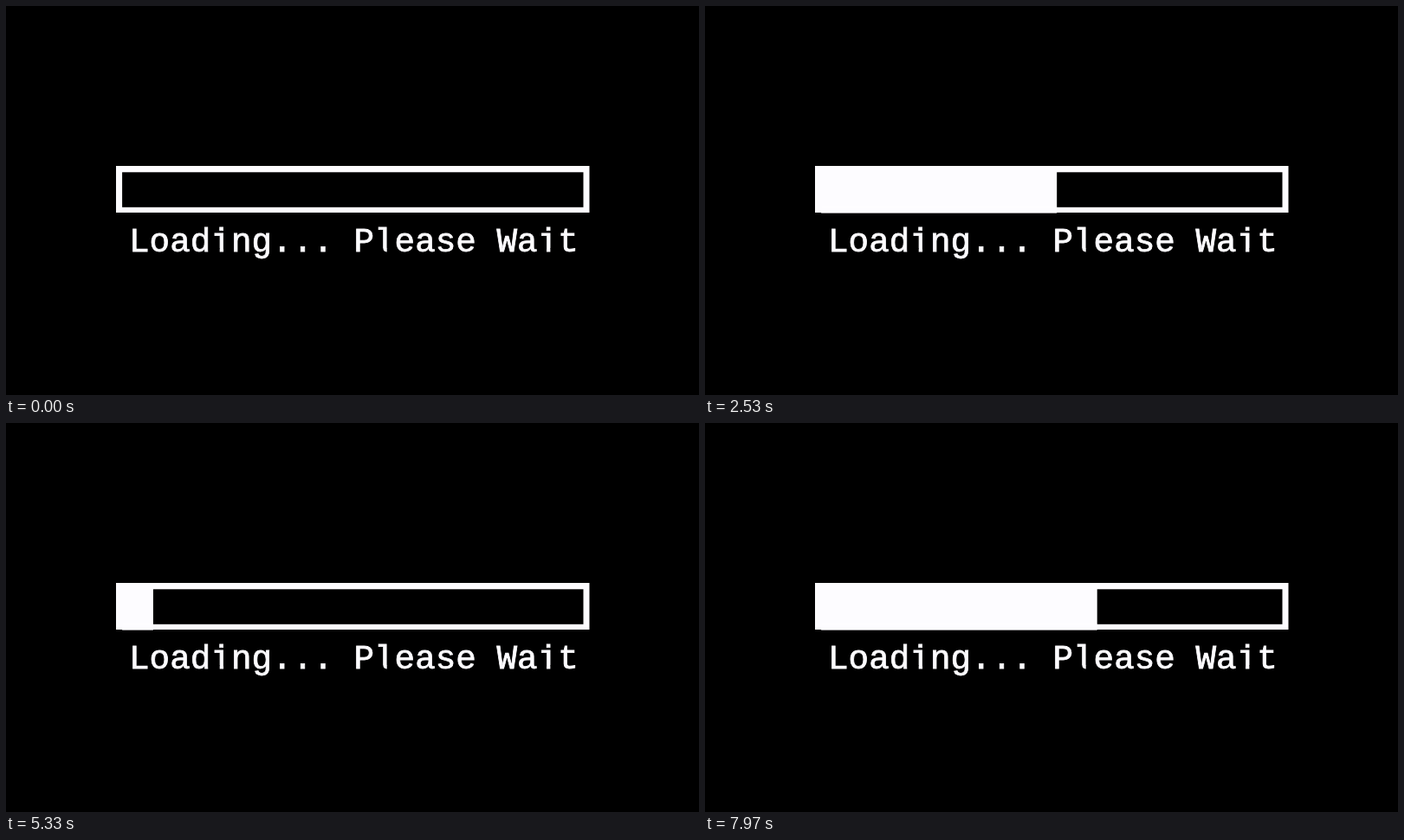
Animation, 800 px wide and 450 px high, one loop 8000 ms. Source, as an HTML page with a canvas:

```html
<!DOCTYPE html>
<html lang="en">
<head>
<meta charset="utf-8">
<title>Loading</title>
<style>
  html, body { margin: 0; width: 100%; height: 100%; overflow: hidden; background: #000; }
  canvas { display: block; }
</style>
</head>
<body>
<canvas id="stage" width="800" height="450"></canvas>
<script>
const ctx = document.getElementById('stage').getContext('2d');
const LOOP = 8000;
const CYCLE = 150;      // steps per full bar
const STEP = 3.58;      // pixels per step
const INK = '#fdfcff';
const bar = { x: 127, y: 185, w: 546.5, h: 54 };
const hole = { left: 134.1, right: 666.5, top: 192.3, bottom: 232.8 };
const label = { text: 'Loading... Please Wait', x: 142, y: 284.3, size: 39.3 };

function box(color, x, y, w, h) {
  ctx.fillStyle = color;
  ctx.fillRect(x, y, w, h);
}

// Thirty steps per second, on times rounded to 10 ms.
function stepAt(ms) {
  const rest = ms % 100;
  return Math.floor(ms / 100) * 3 + (rest >= 70 ? 2 : rest >= 30 ? 1 : 0);
}

function drawBar(ms) {
  const edge = Math.min(hole.right, hole.left + stepAt(ms) % CYCLE * STEP);
  box(INK, bar.x, bar.y, bar.w, bar.h);
  box('#000', edge, hole.top, hole.right - edge, hole.bottom - hole.top);
  // The fill reaches slightly below the frame.
  box(INK, hole.left, hole.bottom, edge - hole.left, 6.8);
}

function drawLabel() {
  const { text, x, y, size } = label;
  ctx.font = `${size}px "Liberation Mono", monospace`;
  ctx.fillStyle = ctx.strokeStyle = INK;
  ctx.lineWidth = 0.8;
  ctx.fillText(text, x, y);
  ctx.strokeText(text, x, y);

  // The letters i and l stand on a bare stem: cover their feet.
  const advance = ctx.measureText('i').width;
  const stemLeft = advance * 0.44, stemRight = advance * 0.625;
  [...text].forEach((char, i) => {
    if (!'il'.includes(char)) return;
    const left = x + i * advance;
    box('#000', left, y - 4, stemLeft, 5);
    box('#000', left + stemRight, y - 4, advance - stemRight, 5);
  });
}

function draw(ms) {
  box('#000', 0, 0, 800, 450);
  drawBar(ms);
  drawLabel();
}

const start = performance.now();
function tick() {
  draw((performance.now() - start) % LOOP);
  requestAnimationFrame(tick);
}
tick();
</script>
</body>
</html>
```
